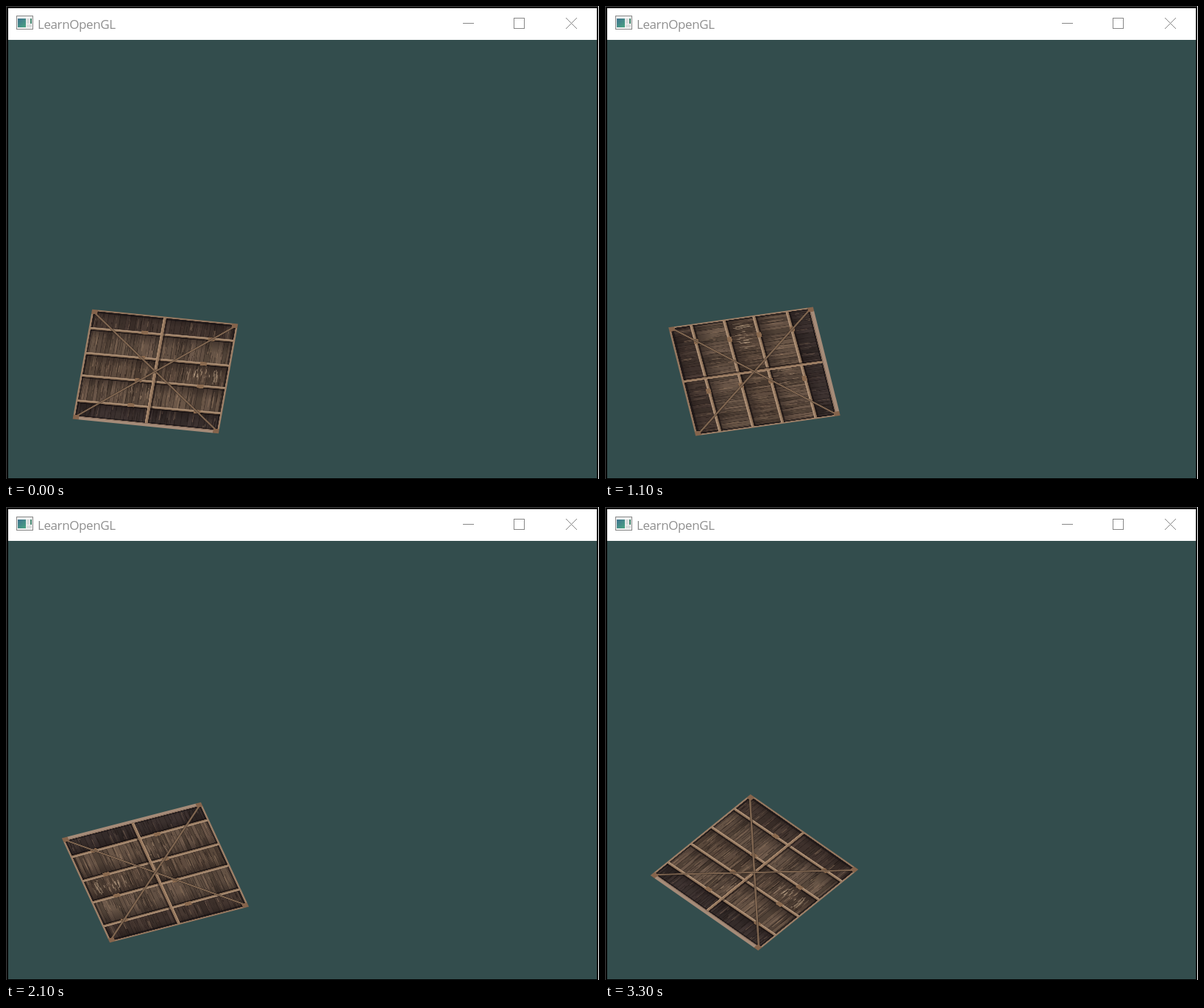
An HTML page with a canvas for the animation above (3400 ms loop, 806 by 642 pixels).

```html
<!DOCTYPE html>
<html lang="en">
<head>
<meta charset="utf-8">
<title>LearnOpenGL</title>
<style>
  html, body { margin: 0; width: 100%; height: 100%; overflow: hidden; background: #000; }
  canvas { display: block; }
</style>
</head>
<body>
<canvas id="stage" width="806" height="642"></canvas>
<script>
const ctx = document.getElementById('stage').getContext('2d');
const SIZE = 400; // crate texture, twice its drawn size

let seed = 7;
function rand(a = 0, b = 1) {
  seed = (seed * 16807) % 2147483647;
  return a + (b - a) * seed / 2147483647;
}

function rect(c, color, x, y, w, h) {
  c.fillStyle = color;
  c.fillRect(x, y, w, h);
}

function line(c, color, width, x1, y1, x2, y2) {
  c.strokeStyle = color;
  c.lineWidth = width;
  c.beginPath();
  c.moveTo(x1, y1);
  c.lineTo(x2, y2);
  c.stroke();
}

// Short vertical wood-grain marks inside a box
function grain(c, count, x, y, w, h, rgb, alpha) {
  for (let i = 0; i < count; i++) {
    const len = rand(4, h * 0.55);
    rect(c, `rgba(${rgb},${rand(0.1, alpha)})`, x + rand(0, w), y + rand(0, h - len), rand(1, 3), len);
  }
}

function makeCrate() {
  const canvas = document.createElement('canvas');
  canvas.width = canvas.height = SIZE;
  const c = canvas.getContext('2d');
  const battens = [65, 156, 238, 330];
  const edges = [0, ...battens, SIZE];
  const tones = [[67, 53, 47], [97, 79, 66], [85, 68, 56], [95, 77, 64], [56, 46, 44]];

  tones.forEach((tone, row) => {
    const top = edges[row], h = edges[row + 1] - top;
    for (let x = 0; x < SIZE;) {
      const w = rand(8, 19), k = rand(0.82, 1.15);
      rect(c, `rgb(${tone.map(v => Math.round(v * k))})`, x, top, w + 1, h);
      rect(c, 'rgba(24,17,16,.45)', x, top, 1.5, h);
      x += w;
    }
    grain(c, 65, 8, top, 384, h, '30,22,20', 0.55);
    grain(c, row % 4 ? 60 : 25, 8, top, 384, h, '165,134,108', 0.5);
    // Planks darken toward the batten above
    const shade = c.createLinearGradient(0, top, 0, top + h * 0.5);
    shade.addColorStop(0, 'rgba(24,17,17,.5)');
    shade.addColorStop(1, 'rgba(24,17,17,0)');
    rect(c, shade, 0, top, SIZE, h * 0.5);
  });
  grain(c, 35, 285, 172, 95, 58, '210,182,152', 0.7);
  grain(c, 16, 135, 245, 60, 70, '190,158,130', 0.55);

  // Dark recess around the inside of the rim
  c.strokeStyle = 'rgba(22,17,19,.6)';
  c.lineWidth = 6;
  c.strokeRect(7, 9, 386, 378);

  for (const y of battens) {
    const batten = (color, width, dy) => line(c, color, width, 4, y + 3 + dy, 396, y - 3 + dy);
    batten('rgba(22,15,15,.6)', 6, 6);
    batten('#92765d', 8, 0);
    batten('#b2957b', 3, -2);
    for (const x of [142, 322]) rect(c, '#8a6a4f', x + rand(-8, 8), y - 7, 18, 13);
  }
  rect(c, 'rgba(22,15,15,.5)', 203, 6, 6, 386);
  rect(c, '#92755c', 196, 4, 8, 390);
  rect(c, '#ab8b6f', 196, 4, 3, 390);

  for (const x of [0, SIZE]) {
    line(c, 'rgba(28,20,18,.45)', 8, x, 3, SIZE - x, 397);
    line(c, '#7d644f', 5, x, 3, SIZE - x, 397);
  }

  rect(c, '#94775f', 0, 0, SIZE, 5);
  rect(c, '#9c7f67', 0, 0, 5, SIZE);
  rect(c, '#9c7f67', 395, 0, 5, SIZE);
  rect(c, '#a58b78', 0, 388, SIZE, 12);
  rect(c, '#89705f', 0, 388, SIZE, 3);
  for (const x of [0, 384])
    for (const y of [0, 384]) rect(c, '#85644c', x, y, 16, 16);
  return canvas;
}

const crate = makeCrate();

function drawWindow() {
  rect(ctx, '#404040', 0, 0, 806, 642);
  rect(ctx, '#000', 1, 1, 804, 641);
  rect(ctx, '#fff', 805, 0, 1, 642);
  rect(ctx, '#fff', 3, 3, 800, 43);
  rect(ctx, '#334d4d', 3, 46, 800, 595);

  // Application icon
  rect(ctx, '#878787', 14, 13, 23, 19);
  rect(ctx, '#f3f3f3', 15, 14, 21, 17);
  const shade = ctx.createLinearGradient(16, 17, 27, 29);
  shade.addColorStop(0, '#3d718f');
  shade.addColorStop(1, '#4ba582');
  rect(ctx, shade, 16, 17, 11, 12);
  rect(ctx, '#d9dcdc', 28, 17, 4, 7);
  rect(ctx, '#d9dcdc', 28, 25, 7, 4);
  rect(ctx, '#43866f', 33, 17, 2, 7);

  ctx.fillStyle = '#8f8f8f';
  ctx.font = '17px "Open Sans", "Noto Sans", sans-serif';
  ctx.letterSpacing = '-0.4px';
  ctx.fillText('LearnOpenGL', 43, 31);

  const gray = '#878787';
  line(ctx, gray, 1, 621, 23.5, 636, 23.5);
  ctx.strokeRect(690.5, 16.5, 14, 14);
  line(ctx, gray, 1, 761, 16, 776, 31);
  line(ctx, gray, 1, 776, 16, 761, 31);
}

function draw(now) {
  const t = Math.floor(now % 3400 / 100) * 0.1;
  const degrees = -7.6 + 98.4 * t; // counterclockwise
  drawWindow();
  ctx.save();
  ctx.translate(203, 496);
  ctx.scale(1, 0.75);
  ctx.rotate(-degrees * Math.PI / 180);
  ctx.drawImage(crate, -100, -100, 200, 200);
  ctx.restore();
}

const start = performance.now();
function tick() {
  draw(performance.now() - start);
  requestAnimationFrame(tick);
}
tick();
</script>
</body>
</html>
```
